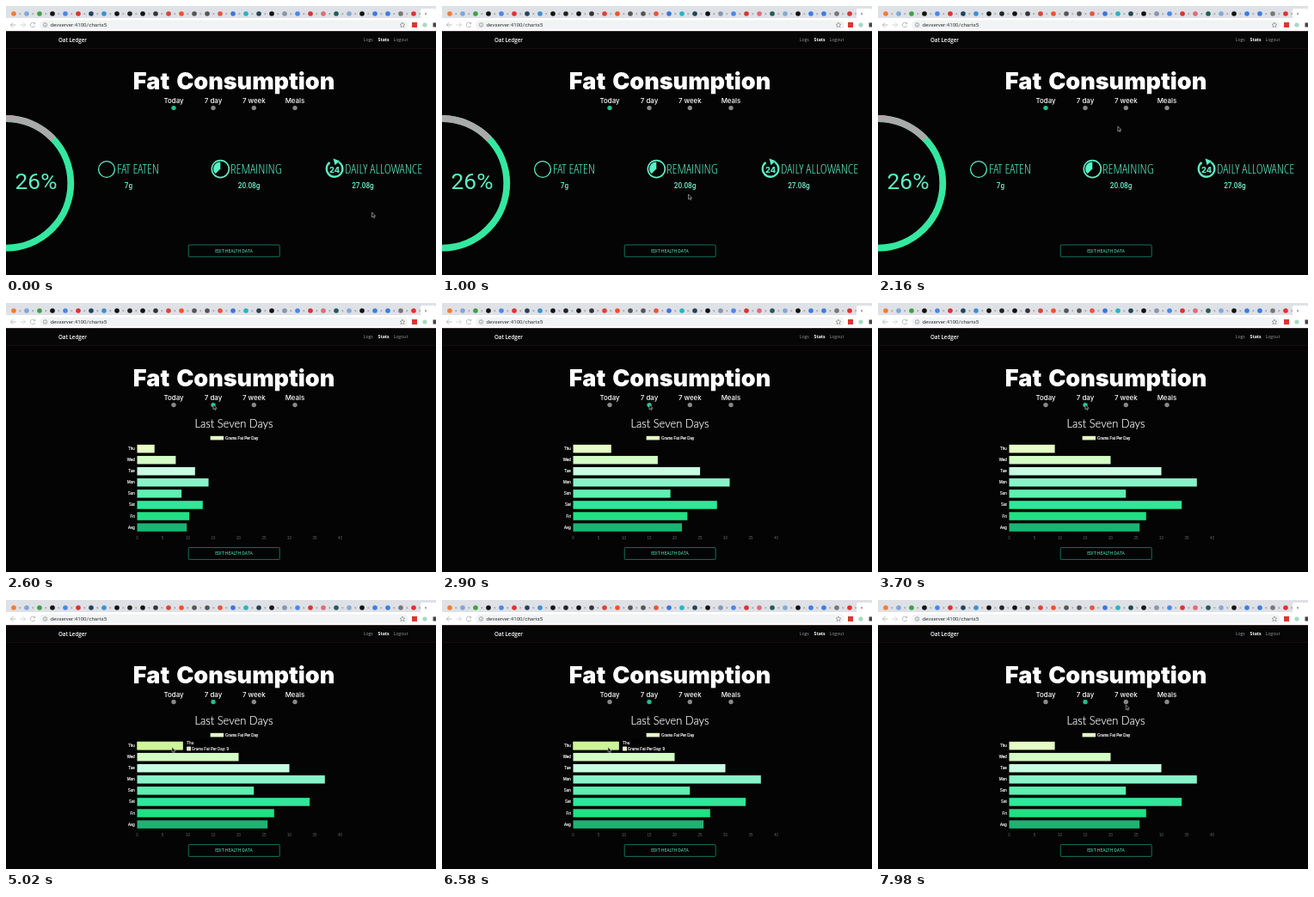
An HTML page for the animation above (8000 ms loop, 500 by 313 pixels).

```html
<!DOCTYPE html>
<html lang="en">
<head>
<meta charset="utf-8">
<title>Fat Consumption</title>
<style>
  html, body { margin: 0; width: 100%; height: 100%; overflow: hidden; background: #040404; }
  svg { display: block; width: 100vw; height: 100vh; }
  .title { font: 900 27px Inter, sans-serif; word-spacing: 2.6px; }
  .tab { font: 500 7.9px Inter, sans-serif; }
  .head { font: 300 15.4px "Open Sans", sans-serif; font-stretch: 75%; }
  .value { font: 500 8.2px Roboto, sans-serif; }
  .percent { font: 400 26.3px Roboto, sans-serif; }
  .hours { font: 800 9.2px Inter, sans-serif; }
  .button { font: 400 5.05px Roboto, sans-serif; }
  .brand { font: 600 6.2px "Open Sans", sans-serif; }
  .link { font: 400 5.2px "Open Sans", sans-serif; }
  .url { font: 400 6.2px Roboto, sans-serif; }
  .close { font: 400 5px Roboto, sans-serif; }
  .chartTitle { font: 300 12.9px Lato, sans-serif; stroke: #fff; stroke-width: .18px; }
  .label { font: 400 4.45px "Liberation Sans", Arial, sans-serif; }
  .crisp { stroke: #fff; stroke-width: .16px; }
  .bold { font-weight: 700; }
  .mid { text-anchor: middle; }
  .end { text-anchor: end; }
</style>
</head>
<body>
<script>
const LOOP = 8000, SWAP = 2465, GROW = 1206;
const MINT = '#5cf0c4', WHITE = '#fff';

function add(parent, tag, attrs = {}, text) {
  const node = document.createElementNS('http://www.w3.org/2000/svg', tag);
  for (const key in attrs) node.setAttribute(key, attrs[key]);
  if (text !== undefined) node.textContent = text;
  parent.append(node);
  return node;
}
const label = (parent, x, y, text, cls, fill = WHITE) =>
  add(parent, 'text', { x, y, class: cls, fill }, text);
const rect = (parent, x, y, width, height, fill, more) =>
  add(parent, 'rect', { x, y, width, height, fill, ...more });
const circle = (parent, cx, cy, r, fill, more) =>
  add(parent, 'circle', { cx, cy, r, fill, ...more });
const line = (parent, d, stroke, width) =>
  add(parent, 'path', { d, stroke, 'stroke-width': width, fill: 'none' });

const svg = add(document.body, 'svg', { viewBox: '0 0 500 313', preserveAspectRatio: 'none' });
rect(svg, 0, 0, 500, 313, '#040404');

// Browser bar
const tabColors = ('f47b30 7fa6d6 3f9f48 111 4c86e8 e03030 24415c 3b8fd0 111 222 111 333 d8433a ' +
  'f4502a 555 555 e5533d 3f74d8 25b3c0 234452 111 8596ac 4c86e8 d83434 e06a78 245a58 84a8d2 111 ' +
  '3b7de0 3b7de0 777 e03030').split(' ');
rect(svg, 0, 0, 500, 14, '#dee1e6');
tabColors.forEach((color, i) => {
  const x = 9 + i * 15;
  circle(svg, x, 9, 2.8, '#' + color);
  label(svg, x + 7.4, 10.6, '×', 'close mid', '#888');
});
rect(svg, 482, 3, 18, 12, WHITE, { rx: 2 });
label(svg, 488, 10.6, '×', 'close mid', '#555');
rect(svg, 0, 14, 500, 15.5, WHITE);
rect(svg, 39, 16.5, 429, 11, '#f1f3f4', { rx: 5.5 });
line(svg, 'M11.5 22H5.5M8.2 19.2L5.4 22L8.2 24.8', '#aaa', .8);
line(svg, 'M16.5 22H22.5M19.8 19.2L22.6 22L19.8 24.8', '#ccc', .8);
line(svg, 'M33.4 20.3A2.8 2.8 0 1 0 33.7 23M33.8 18.8V20.8H31.8', '#aaa', .8);
circle(svg, 45.5, 22, 2.3, 'none', { stroke: '#777', 'stroke-width': .6 });
line(svg, 'M45.5 21.7V23.3M45.5 20.5V21', '#777', .6);
label(svg, 51.5, 24.1, 'devserver:4100/charts5', 'url', '#333');
line(svg, 'M461 19L461.9 21L464 21.2L462.4 22.6L462.9 24.7L461 23.6L459.1 24.7L459.6 22.6L458 21.2L460.1 21Z', '#777', .6);
rect(svg, 472, 19, 6, 6, '#d9382e');
circle(svg, 487, 22, 2.6, '#a6d8c0');
rect(svg, 496.5, 19.5, 4, 5, '#444');

// Page header
rect(svg, -1, 29.7, 502, 20, '#060606', { stroke: '#2a0e10', 'stroke-width': .6 });
label(svg, 61, 41.8, 'Oat Ledger', 'brand');
label(svg, 415.7, 41.3, 'Logs', 'link', '#999');
label(svg, 432.6, 41.3, 'Stats', 'link bold');
label(svg, 450.5, 41.3, 'Logout', 'link', '#999');
label(svg, 265, 96.7, 'Fat Consumption', 'title mid');
const dots = [['Today', 195], ['7 day', 241], ['7 week', 288.3], ['Meals', 336]].map(([name, x]) => {
  label(svg, x, 113.3, name, 'tab mid');
  return circle(svg, x, 118.6, 2.7, '#888');
});
const button = add(svg, 'g');
rect(button, 212.2, 278, 106, 13.8, 'none', { rx: 1, stroke: '#178f70', 'stroke-width': .8 });
label(button, 265, 286.8, 'EDIT HEALTH DATA', 'button mid', MINT);

// Today view
const today = add(svg, 'g');
circle(today, 0, 206.3, 75.3, 'none', { stroke: '#34e8a0', 'stroke-width': 7.8 });
line(today, 'M0 131A75.3 75.3 0 0 1 55 154.9', '#aaa', 7.8);
label(today, 35, 212.6, '26%', 'percent mid', MINT);
const heads = [['FAT EATEN', 129, '7g', 142.5], ['REMAINING', 261, '20.08g', 282.6],
  ['DAILY ALLOWANCE', 394, '27.08g', 415]].map(([name, x, value, valueX]) => {
  const place = add(today, 'g', { transform: `translate(${x} 195)` });
  label(today, valueX, 212.4, value, 'value mid', '#72f2cf');
  return label(place, 0, 0, name, 'head', MINT);
});
// Narrow the headings only where no condensed face is available
if (heads[2].getComputedTextLength() > 115)
  heads.forEach(head => head.setAttribute('transform', 'scale(.72 1)'));
circle(today, 117, 190, 9.4, 'none', { stroke: MINT, 'stroke-width': 1.3 });
circle(today, 249.3, 189.6, 10, 'none', { stroke: MINT, 'stroke-width': 1.6 });
add(today, 'path', { d: 'M249.3 189.6V181.6A8 8 0 0 0 243.6 195.3Z', fill: MINT });
line(today, 'M376.5 182A9.3 9.3 0 1 0 387 181.6', MINT, 2.3);
add(today, 'path', { d: 'M380.5 177.5L388 180.2L382.6 185.2Z', fill: MINT });
label(today, 382, 193.6, '24', 'hours mid', MINT);

// Seven day view
const LEFT = 152.5, UNIT = 5.9, ROW = 13.07, TOP = 169.6;
const week = add(svg, 'g');
label(week, 265, 145.4, 'Last Seven Days', 'chartTitle mid');
rect(week, 237.6, 154.8, 15.4, 4.6, '#e4fbc6');
label(week, 255, 158.7, 'Grams Fat Per Day', 'label crisp');
const days = [['Thu', 9, '#e6fcc6'], ['Wed', 20, '#d4fdc6'], ['Tue', 30, '#c8fde4'],
  ['Mon', 37, '#88f3c9'], ['Sun', 23, '#5eefb2'], ['Sat', 34, '#30e79a'],
  ['Fri', 27, '#22e083'], ['Avg', 180 / 7, '#1bb473']];
const bars = days.map(([name, grams, color], i) => {
  const y = TOP + i * ROW;
  label(week, 149.7, y + 1.5, name, 'label crisp end');
  return rect(week, LEFT, y - 4.75, 0, 9.5, color);
});
for (let n = 0; n <= 40; n += 5) label(week, LEFT + n * UNIT, 275.2, n, 'label mid', '#666');

// Hover state of one bar: darker fill and a tooltip on the given side of its end
function makeHover(index, fill, text, width, side) {
  const [name, grams, color] = days[index], y = TOP + index * ROW, end = LEFT + grams * UNIT;
  const x = side > 0 ? end + 2 : end - 2 - width;
  const group = add(week, 'g');
  rect(group, LEFT, y - 4.75, grams * UNIT, 9.5, fill);
  rect(group, x, y - 7.7, width, 15.4, '#000', { 'fill-opacity': .8, rx: 1.5 });
  label(group, x + 2.7, y - 1.7, name, 'label bold');
  rect(group, x + 3, y + 1.4, 4, 4, color, { stroke: WHITE, 'stroke-width': .8 });
  label(group, x + 8.2, y + 5, text, 'label crisp');
  return group;
}
const hovers = [
  [makeHover(0, '#cdf598', 'Grams Fat Per Day: 9', 54, 1), 4860, 320, 6590],
  [makeHover(7, '#12a164', 'Grams Fat Per Day: 25.71', 62, -1), 6640, 180, 7600]
];

const cursor = add(svg, 'path', {
  d: 'M0 0V6L1.4 4.8L2.3 6.7L3.2 6.3L2.3 4.4H4.2Z',
  fill: '#111', stroke: '#ddd', 'stroke-width': .5
});
const moves = [[0, 425.5, 240], [20, 425.5, 240], [240, 250, 261], [440, 46, 224], [600, 46, 224],
  [800, 140, 215], [990, 286.5, 219], [1060, 286.5, 219], [1260, 412, 217], [1980, 412, 217],
  [2240, 241, 118], [4320, 241, 118], [4480, 240.6, 117.6], [4740, 240.6, 117.6],
  [4920, 193, 171.3], [6580, 193, 171.3], [6780, 205, 260], [7560, 205, 260],
  [7960, 288.2, 121.8], [LOOP, 288.2, 121.8]];

const clamp = v => Math.max(0, Math.min(1, v));
const easeOut = v => 1 - (1 - clamp(v)) ** 4;
const smooth = v => v * v * (3 - 2 * v);

function draw(t) {
  const onWeek = t >= SWAP;
  today.setAttribute('display', onWeek ? 'none' : 'inline');
  week.setAttribute('display', onWeek ? 'inline' : 'none');
  button.setAttribute('transform', `translate(0 ${onWeek ? 6.6 : 0})`);
  dots[0].setAttribute('fill', onWeek ? '#888' : '#20be8e');
  dots[1].setAttribute('fill', onWeek ? '#20be8e' : '#888');

  const grown = easeOut((t - SWAP) / GROW);
  bars.forEach((bar, i) => bar.setAttribute('width', days[i][1] * UNIT * grown));
  for (const [group, from, fade, to] of hovers)
    group.setAttribute('opacity', easeOut((t - from) / fade) * (1 - easeOut((t - to) / 200)));

  const next = moves.findIndex(move => move[0] > t);
  const [t0, x0, y0] = moves[next - 1], [t1, x1, y1] = moves[next];
  const k = smooth((t - t0) / (t1 - t0));
  cursor.setAttribute('transform', `translate(${x0 + (x1 - x0) * k} ${y0 + (y1 - y0) * k})`);
}

function tick() {
  draw(performance.now() % LOOP);
  requestAnimationFrame(tick);
}
tick();
</script>
</body>
</html>
```
